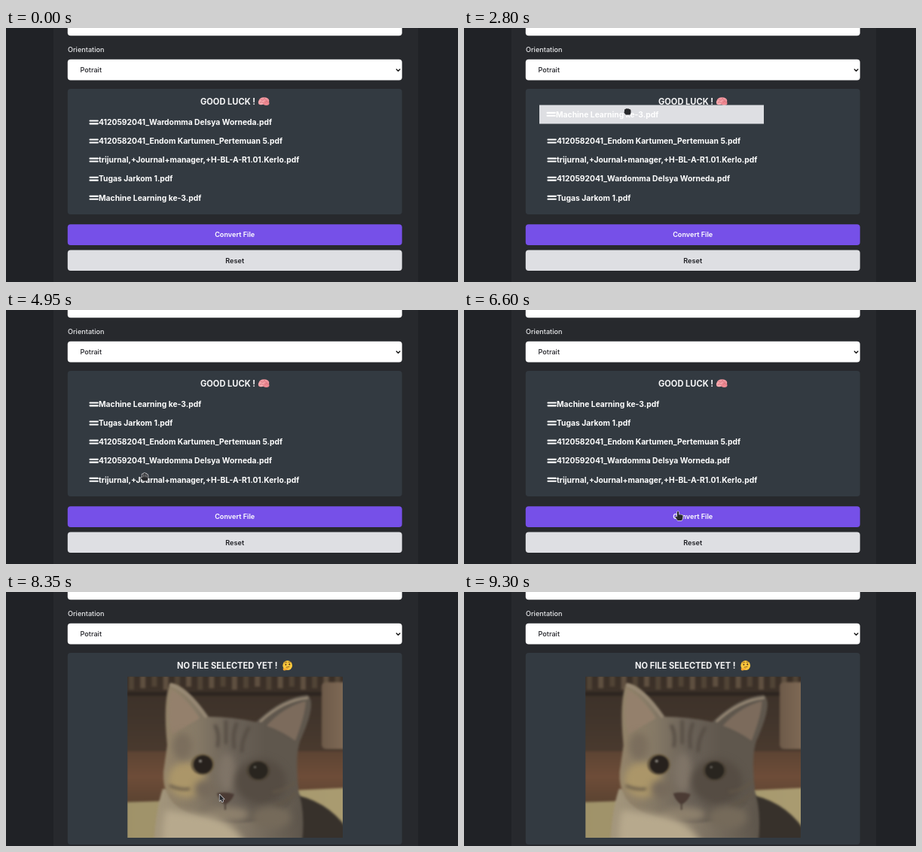
An HTML page with a canvas that plays this animation: 600 px wide and 338 px high, repeating every 9350 ms.

```html
<!DOCTYPE html>
<html lang="id">
<head>
<meta charset="utf-8">
<title>File order</title>
<style>
  html, body { margin: 0; width: 100%; height: 100%; overflow: hidden; background: #212327; }
  canvas { display: block; width: 600px; height: 338px; }
</style>
</head>
<body>
<canvas id="stage" width="600" height="338"></canvas>
<script>
const ctx = document.getElementById('stage').getContext('2d');
const LOOP = 9350, STEP = 50, SWAP = 8000, CURSOR_END = 8950;
const ROW_Y = 125.4, PITCH = 25.1;
const LEFT = 81.8, WIDTH = 443.9;
const LIGHT = '#dedfe3', PANEL = '#333a41';

const files = [
  '4120592041_Wardomma Delsya Worneda.pdf',
  '4120582041_Endom Kartumen_Pertemuan 5.pdf',
  'trijurnal,+Journal+manager,+H-BL-A-R1.01.Kerlo.pdf',
  'Tugas Jarkom 1.pdf',
  'Machine Learning ke-3.pdf'
];

// A dropped row stays highlighted until `clear`.
const drags = [
  { file: 0, to: 2, start: 1000, drop: 1550, clear: 1950 },
  { file: 4, to: 0, start: 2050, drop: 2900, clear: 3250 },
  { file: 3, to: 1, start: 3300, drop: 3950, clear: 4400 },
  { file: 2, to: 4, start: 4450, drop: 4900, clear: 4950 }
];

const cursorPath = [
  [50, 328, 273], [250, 328, 273], [750, 323, 134], [1000, 323, 134],
  [1400, 322, 191], [1550, 322, 185], [1650, 322, 185], [1950, 218, 222],
  [2050, 218, 222], [2800, 217, 111], [2900, 217, 121], [3250, 176, 224],
  [3300, 176, 224], [3850, 175, 150], [4000, 175, 150], [4200, 175, 200],
  [4350, 184, 200], [4450, 184, 200], [4900, 184, 222], [5750, 184, 222],
  [5900, 383, 182], [6100, 383, 182], [6400, 285, 273], [8000, 285, 273]
];

const clamp = (v, a, b) => Math.max(a, Math.min(b, v));
const ease = p => p * p * (3 - 2 * p);
const slotY = i => ROW_Y + PITCH * i;

function cursorAt(t) {
  const next = cursorPath.findIndex(k => k[0] > t);
  if (next < 0) return cursorPath[cursorPath.length - 1].slice(1);
  if (next === 0) return cursorPath[0].slice(1);
  const [t0, x0, y0] = cursorPath[next - 1], [t1, x1, y1] = cursorPath[next];
  const p = ease((t - t0) / (t1 - t0));
  return [x0 + (x1 - x0) * p, y0 + (y1 - y0) * p];
}

function box(x, y, w, h, color, r = 0) {
  ctx.fillStyle = color;
  ctx.beginPath();
  ctx.roundRect(x, y, w, h, r);
  ctx.fill();
}

function text(str, x, y, size, weight, color, align = 'left') {
  ctx.font = `${weight} ${size}px Inter, sans-serif`;
  ctx.textAlign = align;
  ctx.fillStyle = color;
  ctx.fillText(str, x, y);
}

function oval(x, y, rx, ry, color) {
  ctx.fillStyle = color;
  ctx.beginPath();
  ctx.ellipse(x, y, rx, ry, 0, 0, 7);
  ctx.fill();
}

function shape(d, color) {
  ctx.fillStyle = color;
  ctx.fill(new Path2D(d));
}

function line(d, color, width) {
  ctx.strokeStyle = color;
  ctx.lineWidth = width;
  ctx.lineCap = ctx.lineJoin = 'round';
  ctx.stroke(new Path2D(d));
}

function fade(x0, y0, x1, y1, ...colors) {
  const g = ctx.createLinearGradient(x0, y0, x1, y1);
  colors.forEach((c, i) => g.addColorStop(i / (colors.length - 1), c));
  return g;
}

function drawForm() {
  box(0, 0, 600, 338, '#202226');
  box(63, 0, 484, 338, '#27292d');
  box(LEFT, -20, WIDTH, 30.3, '#fff', 4);
  text('Orientation', 82, 31.8, 9.15, 500, '#e8e9eb');
  box(LEFT, 41.7, WIDTH, 27.9, '#fff', 4);
  text('Potrait', 98.5, 59.3, 9.15, 500, '#202126');
  line('M518.3 55 L520.6 57.3 L522.9 55', '#111', 1.4);
}

function drawHeading(str, x) {
  text(str, x, 101.9, 11.1, 700, '#f5f5f6');
}

function drawButton(label, y, fill, color) {
  box(LEFT, y, WIDTH, 27.7, fill, 4);
  text(label, 303.7, y + 17.1, 9.15, 600, color, 'center');
}

function drawRow(file, x, y, lit) {
  if (lit) box(x, y - 12.4, 298, 25, LIGHT);
  box(x + 9.5, y - 3, 12.3, 2.1, '#fff', 0.8);
  box(x + 9.5, y + 0.9, 12.3, 2.1, '#fff', 0.8);
  text(files[file], x + 22, y + 3.7, 10.3, 700, '#fff');
}

function drawBrain() {
  oval(342.5, 97, 6.8, 4.8, '#f39aa2');
  oval(345.5, 100, 4, 3, '#ee8992');
  oval(338.5, 99, 3.6, 3.2, '#f7a9ae');
  line('M338 95 q2 3 4 0 M343 93 q0 4 4 3 M337 99 q3 -2 5 1 M344 99 q2 -3 4 0', '#cf6873', 0.8);
}

function drawThinking() {
  oval(373.7, 97.7, 6.4, 6.4, '#fcc83b');
  oval(371.4, 96.6, 0.9, 1.2, '#5a3c22');
  oval(376.3, 96.3, 0.9, 1.2, '#5a3c22');
  line('M369.8 94 q1.6 -1.5 3 -.4 M375 93.4 l2.8 -.4 M372 100.2 l4 -.7', '#68451f', 0.8);
  shape('M368 101 q4 2 6 -.5 q2 .5 0 2 q-2 2.3 -5 2 q-2 -1 -1 -3.5z', '#f0a330');
}

function drawList(t) {
  box(LEFT, 81, WIDTH, 167, PANEL, 4);
  drawHeading('GOOD LUCK !', 258);
  drawBrain();
  drawButton('Convert File', 261.3, '#7650e8', '#fff');
  drawButton('Reset', 295.4, LIGHT, '#202126');

  let order = files.map((_, i) => i), lit = null;
  for (const d of drags) {
    if (t < d.start) break;
    const from = order.indexOf(d.file);
    let slot = d.to, x = 101, y = slotY(slot);
    if (t < d.drop) {
      const a = cursorAt(d.start), b = cursorAt(t);
      x += b[0] - a[0];
      y = slotY(from) + b[1] - a[1];
      slot = clamp(Math.round((y - ROW_Y) / PITCH), 0, 4);
    }
    order = order.filter(f => f !== d.file);
    order.splice(slot, 0, d.file);
    lit = t < d.clear ? { file: d.file, x, y } : null;
  }
  order.forEach((f, i) => {
    if (!lit || f !== lit.file) drawRow(f, 101, slotY(i), false);
  });
  if (lit) drawRow(lit.file, lit.x, lit.y, true);
}

function drawRoom() {
  box(150, 100, 310, 118, fade(0, 112, 0, 215, '#3a2f27', '#40342b', '#4a3a2e'));
  for (let i = 0; i < 19; i++) box(163 + i * 15.2, 100, 7, 30 - i % 3 * 2, i % 2 ? '#5f5040' : '#514436');
  box(150, 133, 310, 5, '#2d2520');
  box(419, 120, 45, 89, fade(419, 0, 447, 0, '#6d5a49', '#7d6854'), 6);
  box(150, 212, 310, 70, fade(0, 212, 0, 280, '#5c4433', '#6d4c38', '#5b4331'));
  shape('M150 280 L250 277 L380 264 L460 260 V340 H150Z', fade(161, 0, 447, 0, '#9f9269', '#a99b70'));
}

function drawCat(t) {
  ctx.save();
  ctx.beginPath();
  ctx.rect(161.3, 112.7, 285.7, 214.3);
  ctx.clip();
  ctx.filter = 'blur(1.5px)';
  drawRoom();
  ctx.translate(-2.3 * ease(clamp((t - 8350) / 900, 0, 1)), 0);

  // Body and head
  shape('M375 268 Q425 276 452 314 V340 H350Z', '#37312b');
  shape('M208 262 Q198 292 196 340 H392 Q399 292 386 258Z', fade(200, 0, 390, 0, '#a3967c', '#8b7f6d', '#5e564c'));
  shape('M214 204 Q208 145 218 121 Q238 122 269 166 Q300 166 332 173 Q366 140 400 137 Q413 146 393 192 Q383 210 388 260 Q377 302 325 306 Q281 311 244 295 Q207 280 209 239Z',
    fade(209, 0, 390, 0, '#94846a', '#857966', '#6b6258', '#5f574d', '#5f574d'));
  shape('M219 130 Q213 166 221 190 Q239 178 257 168 Q239 140 219 130Z', '#94806c');
  shape('M398 145 Q368 153 346 178 Q366 185 384 198 Q397 165 398 145Z', '#7c6b5c');
  line('M219 124 Q240 130 265 166 M338 172 Q368 144 400 141', '#9a8b77', 3);

  // Soft patches of fur
  ctx.filter = 'blur(5px)';
  oval(240, 250, 25, 24, '#ab9669');
  oval(234, 205, 13, 18, '#7b6e5d');
  oval(264, 262, 14, 12, '#766a5b');
  oval(293, 240, 12, 26, '#7f7467');
  oval(338, 252, 34, 30, '#554c43');
  oval(293, 296, 30, 10, '#8d806c');
  shape('M212 290 Q206 310 208 340 H320 Q305 306 266 298Z', '#b7a98d');
  oval(352, 300, 26, 15, '#756a5a');
  ctx.filter = 'blur(2px)';
  line('M278 178 Q284 190 281 205 M292 172 V201 M306 175 Q300 191 303 207 M322 181 Q313 196 313 212', '#544b42', 4);
  line('M218 258 q14 6 25 4 M355 266 q17 -2 28 -12 M359 283 q14 -3 25 -15', '#625748', 3);

  // Eyes and nose
  ctx.filter = 'blur(1px)';
  oval(261, 229.5, 15.5, 14, '#6c5e45');
  oval(261.5, 229.5, 12.5, 12, '#27211d');
  oval(258, 225, 2.2, 2, '#85817a');
  oval(335, 238, 16, 13.5, '#4c4337');
  oval(335, 237.5, 12.5, 11.5, '#29251f');
  oval(330.5, 233, 1.8, 1.6, '#66635c');
  shape('M280 268 Q291 265 303 269 Q300 278 291 283 Q283 278 280 268Z', '#4b3b34');
  line('M291 282 V289', '#4d4138', 2);
  ctx.restore();
}

function drawEmpty(t) {
  box(LEFT, 81, WIDTH, 255, PANEL, 4);
  drawHeading('NO FILE SELECTED YET !', 227);
  drawThinking();
  drawCat(t);
}

const cursors = {
  arrow: 'M-1.5 -3.6 V5 L.5 3.3 L1.9 6.4 L3.4 5.7 L2.2 2.7 H4.7Z',
  point: 'M-2 -4.5 Q-.6 -5.6 .2 -4 V-.6 Q5.4 -1 5.6 1.2 Q5.6 5 3.8 7 H-1.4 L-4.6 2.4 Q-4.2 .8 -2 2.4Z',
  grab: 'M-3 1 L-3.6 -3 Q-2.6 -4.5 -1.8 -3 L-1.4 -4.6 Q-.2 -5.8 .6 -4.6 L1 -4.4 Q2.3 -5 2.7 -3.2 Q4.4 -3.6 4.5 -1.8 V2 Q4 5 2.8 5.6 H-2 L-5.2 1.4 Q-4.8 0 -3 1Z',
  grabbing: 'M-4 -.5 Q-4.4 -3.4 -2.2 -3.2 Q-1.2 -4.5 .1 -3.5 Q1.6 -4.3 2.4 -3 Q4.5 -3.2 4.5 -1 V1.5 Q4 4 3 4.6 H-2.2 L-4.6 1.4Z'
};

function drawCursor(t) {
  if (t < cursorPath[0][0] || t >= CURSOR_END) return;
  const [x, y] = cursorAt(t);
  const overRow = x > 101 && x < 399 && y > 113 && y < 239;
  const overButton = y > 261 && y < 323;
  const kind = t >= SWAP ? 'arrow'
    : drags.some(d => t >= d.start && t < d.drop) ? 'grabbing'
    : overRow ? 'grab' : overButton ? 'point' : 'arrow';
  ctx.save();
  ctx.translate(x, y);
  line(cursors[kind], '#e0e0e4', 1.3);
  shape(cursors[kind], '#28292c');
  if (kind === 'grab') line('M-1.4 -2.5 V0 M.8 -3 V0 M2.8 -2 V.3', '#d8d8dc', 0.6);
  ctx.restore();
}

function frame(now) {
  const t = Math.floor(now % LOOP / STEP) * STEP;
  drawForm();
  if (t < SWAP) drawList(t);
  else drawEmpty(t);
  drawCursor(t);
  requestAnimationFrame(frame);
}
frame(0);
</script>
</body>
</html>
```
